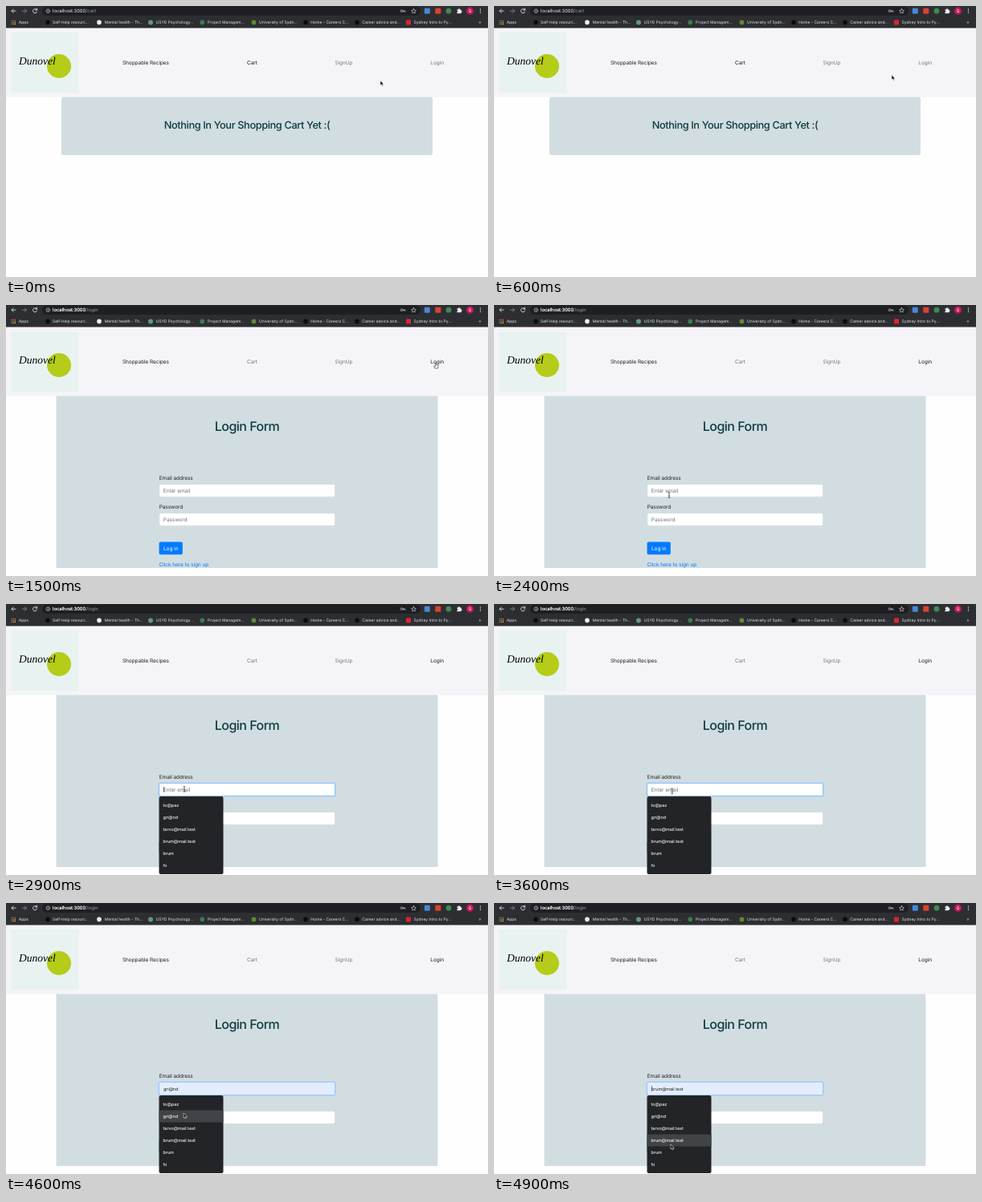
An HTML page for the animation above (5 s loop, 600 by 338 pixels).

```html
<!DOCTYPE html>
<html lang="en">
<head>
<meta charset="utf-8">
<title>Login demo</title>
<style>
  html, body { margin: 0; width: 100%; height: 100%; overflow: hidden; background: #fefefe; }
  svg { display: block; width: 600px; height: 338px; }
  text { font-family: Inter, "Open Sans", sans-serif; text-rendering: geometricPrecision; white-space: pre; }

  .marks text { font-size: 5px; fill: #e4e6e9; }
  .url { font-size: 5.83px; fill: #f1f3f4; }
  .url .path { fill: #9aa0a6; }
  .body { font-size: 6.5px; letter-spacing: -.07px; fill: #1d2124; }
  .body .hint { fill: #6c757d; }
  .title { fill: #0c3c40; font-weight: 500; text-anchor: middle; }
  .list text, .fill text { font-size: 5.4px; letter-spacing: -.02px; }
  .list text { fill: #f1f3f4; font-weight: 500; }
  .fill text { fill: #16181b; }
  .icon { fill: none; stroke: #dfe1e5; stroke-width: .9; stroke-linecap: round; stroke-linejoin: round; }
  .field { fill: #fff; stroke: #ced4da; stroke-width: .5; }

  .anim { animation: 5s step-end infinite; }
  .cart { animation-name: cart; }
  .login { animation-name: login; }
  .nav-cart { animation-name: navCart; }
  .nav-login { animation-name: navLogin; }
  .open { animation-name: open; }
  .caret { animation-name: caret; }
  .hint-mail { animation-name: hintMail; }
  .filled { animation-name: filled; }
  .bar { animation-name: bar; }
  .v1 { animation-name: v1; }
  .v2 { animation-name: v2; }
  .v3 { animation-name: v3; }
  .v4 { animation-name: v4; }
  .cursor { animation-name: move; }
  .arrow { animation-name: arrow; }
  .hand { animation-name: hand; }
  .beam { animation-name: beam; }

  @keyframes cart { 0% { opacity: 1 } 30%, 100% { opacity: 0 } }
  @keyframes login { 0% { opacity: 0 } 30%, 100% { opacity: 1 } }
  @keyframes navCart { 0% { fill: #17191c } 30%, 100% { fill: #77797c } }
  @keyframes navLogin { 0% { fill: #77797c } 22%, 100% { fill: #17191c } }
  @keyframes open { 0% { opacity: 0 } 56%, 100% { opacity: 1 } }
  @keyframes caret { 0%, 68%, 86% { opacity: 0 } 56%, 76%, 96%, 100% { opacity: 1 } }
  @keyframes hintMail { 0% { opacity: 1 } 90%, 100% { opacity: 0 } }
  @keyframes filled { 0% { opacity: 0 } 90%, 100% { opacity: 1 } }
  @keyframes bar {
    0%, 90% { transform: none }
    92% { transform: translateY(15px) }
    94% { transform: translateY(30px) }
    96%, 100% { transform: translateY(45px) }
  }
  @keyframes v1 { 0%, 92%, 100% { opacity: 0 } 90% { opacity: 1 } }
  @keyframes v2 { 0%, 94%, 100% { opacity: 0 } 92% { opacity: 1 } }
  @keyframes v3 { 0%, 96%, 100% { opacity: 0 } 94% { opacity: 1 } }
  @keyframes v4 { 0% { opacity: 0 } 96%, 100% { opacity: 1 } }

  @keyframes arrow { 0%, 32% { opacity: 1 } 22%, 46% { opacity: 0 } 86%, 100% { opacity: 1 } }
  @keyframes hand { 0%, 32%, 100% { opacity: 0 } 22% { opacity: 1 } }
  @keyframes beam { 0%, 86%, 100% { opacity: 0 } 46% { opacity: 1 } }
  @keyframes move {
    0% { transform: translate(466px, 93px) }
    2% { transform: translate(466px, 93px); animation-timing-function: steps(5, end) }
    12% { transform: translate(495px, 86px); animation-timing-function: steps(6, end) }
    24% { transform: translate(535px, 72px) }
    32% { transform: translate(535px, 72px); animation-timing-function: steps(3, end) }
    38% { transform: translate(400px, 148px); animation-timing-function: steps(4, end) }
    46% { transform: translate(218px, 237px) }
    48% { transform: translate(218px, 237px); animation-timing-function: steps(2, end) }
    52% { transform: translate(222px, 231px) }
    68% { transform: translate(222px, 231px); animation-timing-function: steps(4, end) }
    76% { transform: translate(221.5px, 236px) }
    80% { transform: translate(221.5px, 236px); animation-timing-function: steps(3, end) }
    86% { transform: translate(221.5px, 241px); animation-timing-function: steps(2, end) }
    90% { transform: translate(221.5px, 250px) }
    92% { transform: translate(221px, 262px) }
    94% { transform: translate(221px, 277px) }
    96% { transform: translate(220.5px, 291px) }
    98%, 100% { transform: translate(220px, 301px) }
  }
</style>
</head>
<body>
<svg viewBox="0 0 600 338" xmlns="http://www.w3.org/2000/svg">
  <rect width="600" height="338" fill="#fefefe"/>

  <!-- site header -->
  <rect y="27" width="600" height="86.5" fill="#f5f4f8"/>
  <rect x="6.5" y="33" width="83.5" height="75" fill="#e8f2f0"/>
  <circle cx="66" cy="75" r="15" fill="#b5cc18"/>
  <text x="16" y="73" style="font:italic 13.5px 'Liberation Serif',serif">Dunovel</text>
  <g class="body">
    <text x="145" y="73.2">Shoppable Recipes</text>
    <text class="anim nav-cart" x="300" y="73.2">Cart</text>
    <text x="409.5" y="73.2" fill="#77797c">SignUp</text>
    <text class="anim nav-login" x="528.3" y="73.2">Login</text>
  </g>

  <!-- empty cart -->
  <g class="anim cart">
    <rect x="69" y="113.5" width="462" height="72.5" rx="2.5" fill="#d2dde1"/>
    <text class="title" x="300" y="153.2" font-size="12.8" letter-spacing="-.4">Nothing In Your Shopping Cart Yet :(</text>
  </g>

  <!-- login form -->
  <g class="anim login">
    <rect x="62.5" y="113.5" width="475" height="214.5" fill="#d2dde1"/>
    <text class="title" x="300" y="156.6" font-size="16" letter-spacing="-.52">Login Form</text>
    <g class="body">
      <text x="190.7" y="217.7">Email address</text>
      <text x="190.7" y="253.7">Password</text>
      <rect class="field" x="190.8" y="223.7" width="218.6" height="15.6" rx="1.7"/>
      <rect class="field" x="190.8" y="259.7" width="218.6" height="15.6" rx="1.7"/>
      <g class="anim open">
        <rect x="190.2" y="223.1" width="219.8" height="16.8" rx="2.2" fill="none" stroke="#a9cffa" stroke-width="1.4"/>
        <rect x="190.8" y="223.7" width="218.6" height="15.6" rx="1.7" fill="none" stroke="#80bdff" stroke-width=".6"/>
      </g>
      <rect class="anim filled" x="191.2" y="224.1" width="217.8" height="14.8" rx="1.3" fill="#e3edfd"/>
      <text class="hint anim hint-mail" x="195.8" y="234">Enter email</text>
      <text class="hint" x="195.8" y="270">Password</text>
      <rect x="190.6" y="295.4" width="29.2" height="15.8" rx="1.7" fill="#007bff"/>
      <text x="196" y="305.6" style="fill:#fff">Log in</text>
      <text x="190.7" y="325.7" style="fill:#007bff">Click here to sign up</text>
    </g>
    <g class="fill">
      <text class="anim v1" x="196" y="233.8">to@paz</text>
      <text class="anim v2" x="196" y="233.8">gri@nd</text>
      <text class="anim v3" x="196" y="233.8">tarvo@mail.test</text>
      <text class="anim v4" x="196" y="233.8">brum@mail.test</text>
    </g>
    <rect class="anim caret" x="196" y="228" width=".6" height="7" fill="#222"/>
  </g>

  <!-- suggestions -->
  <g class="anim open list">
    <rect x="190.5" y="240" width="80" height="97" rx="2" fill="#232427"/>
    <g class="anim filled"><rect class="anim bar" x="190.5" y="243.5" width="80" height="15" fill="#424347"/></g>
    <text x="195.5" y="253">to@paz</text>
    <text x="195.5" y="268">gri@nd</text>
    <text x="195.5" y="283">tarvo@mail.test</text>
    <text x="195.5" y="298">brum@mail.test</text>
    <text x="195.5" y="313">brum</text>
    <text x="195.5" y="328">hi</text>
  </g>

  <!-- browser bar -->
  <rect width="600" height="27.5" fill="#2d2e31"/>
  <rect x="45" y=".5" width="471" height="11.5" rx="5.75" fill="#1e1f22"/>
  <g class="icon">
    <path d="M12 6.2H7M9.2 4 7 6.2 9.2 8.4"/>
    <path d="M20.5 6.2h5M23.3 4l2.2 2.2-2.2 2.2" stroke="#85878b"/>
    <path d="M38.2 4.7A2.6 2.6 0 1 0 38.6 7M38.5 3.2v1.9h-1.9"/>
    <g stroke-width=".6">
      <circle cx="52.3" cy="6.2" r="2.3"/>
      <path d="M52.3 6v1.3M52.3 4.9v.1"/>
      <circle cx="492.6" cy="6.2" r="1.4"/>
      <path d="M494 6.2h3v1.2M495.6 6.2v1"/>
      <path d="M507.5 3.4l.9 1.9 2 .3-1.5 1.4.4 2.1-1.8-1-1.8 1 .4-2.1-1.5-1.4 2-.3z"/>
    </g>
  </g>
  <text class="url" x="58" y="8.2">localhost:3000<tspan class="path anim cart">/cart</tspan></text>
  <rect class="anim login" x="99.2" y="2" width="20" height="8.5" fill="#1e1f22"/>
  <text class="url anim login" x="58" y="8.2">localhost:3000<tspan class="path">/login</tspan></text>
  <rect x="520.8" y="2.8" width="7" height="7" rx="1" fill="#4a86d8"/>
  <rect x="534.3" y="2.8" width="7" height="7" rx="1" fill="#d9432f"/>
  <circle cx="551" cy="6.2" r="3.4" fill="#3f8a55"/>
  <path d="M561.4 4.4h1.5a1.1 1.1 0 0 1 2.2 0h1.5v1.5a1.1 1.1 0 0 1 0 2.2v1.2h-5.2v-1.5a1 1 0 0 0 0-2z" fill="#eceef0"/>
  <circle cx="577.5" cy="6.2" r="4.6" fill="#c2185b"/>
  <text x="577.5" y="8.1" font-size="5.2" fill="#fff" text-anchor="middle">Q</text>
  <g fill="#dfe1e5"><circle cx="590.5" cy="4" r=".65"/><circle cx="590.5" cy="6.2" r=".65"/><circle cx="590.5" cy="8.4" r=".65"/></g>

  <!-- bookmarks -->
  <g class="marks">
    <g fill="#e2574c"><rect x="6.7" y="17.8" width="1.3" height="1.3"/><rect x="8.7" y="17.8" width="1.3" height="1.3"/><rect x="10.7" y="17.8" width="1.3" height="1.3"/></g>
    <g fill="#58a55c"><rect x="6.7" y="19.8" width="1.3" height="1.3"/><rect x="8.7" y="19.8" width="1.3" height="1.3" fill="#4a86d8"/><rect x="10.7" y="19.8" width="1.3" height="1.3" fill="#e8b93c"/></g>
    <g fill="#e8b93c"><rect x="6.7" y="21.8" width="1.3" height="1.3" fill="#58a55c"/><rect x="8.7" y="21.8" width="1.3" height="1.3"/><rect x="10.7" y="21.8" width="1.3" height="1.3"/></g>
    <circle cx="52" cy="20.4" r="2.8" fill="#0c0c0d"/>
    <circle cx="116" cy="20.4" r="2.8" fill="#eceef0"/>
    <circle cx="180" cy="20.4" r="3" fill="#5d9a86"/>
    <circle cx="244.3" cy="20.4" r="2.8" fill="#3b7d4f"/>
    <circle cx="308.5" cy="20.4" r="2.9" fill="#5f8a34"/>
    <circle cx="373" cy="20.4" r="2.8" fill="#0c0c0d"/>
    <circle cx="437" cy="20.4" r="2.8" fill="#0c0c0d"/>
    <rect x="498" y="17.4" width="6" height="6" rx=".8" fill="#dc2430"/>
    <text x="15.8" y="22.2">Apps</text>
    <text x="58" y="22.2">Self-help resourc...</text>
    <text x="122.7" y="22.2">Mental health - Th...</text>
    <text x="186.5" y="22.2">USYD Psychology...</text>
    <text x="251" y="22.2">Project Managem...</text>
    <text x="315" y="22.2">University of Sydn...</text>
    <text x="379.3" y="22.2">Home - Careers C...</text>
    <text x="443.3" y="22.2">Career advice and...</text>
    <text x="507.5" y="22.2">Sydney Intro to Py...</text>
    <text x="588.5" y="22.2">»</text>
  </g>

  <!-- pointer -->
  <g class="anim cursor">
    <path class="anim arrow" d="M0 0V6L1.4 4.8 2.4 7 3.4 6.5 2.5 4.4H4.3Z" fill="#111" stroke="#fff" stroke-width=".5"/>
    <path class="anim hand" d="M-.6.5Q0-.2.6.5V2.5L2.7 3.1Q3.3 3.4 3.1 4.4L2.5 7H-.9L-2.4 4.6Q-2.4 3.7-1.5 4L-.6 4.7Z" fill="#fff" stroke="#222" stroke-width=".6" stroke-linejoin="round"/>
    <path class="anim beam" d="M-1.4-3.4Q0-3.4 0-2.6 0-3.4 1.4-3.4M0-2.6V2.6M-1.4 3.4Q0 3.4 0 2.6 0 3.4 1.4 3.4M-.8.8H.8" fill="none" stroke="#222" stroke-width=".7"/>
  </g>
</svg>
</body>
</html>
```
